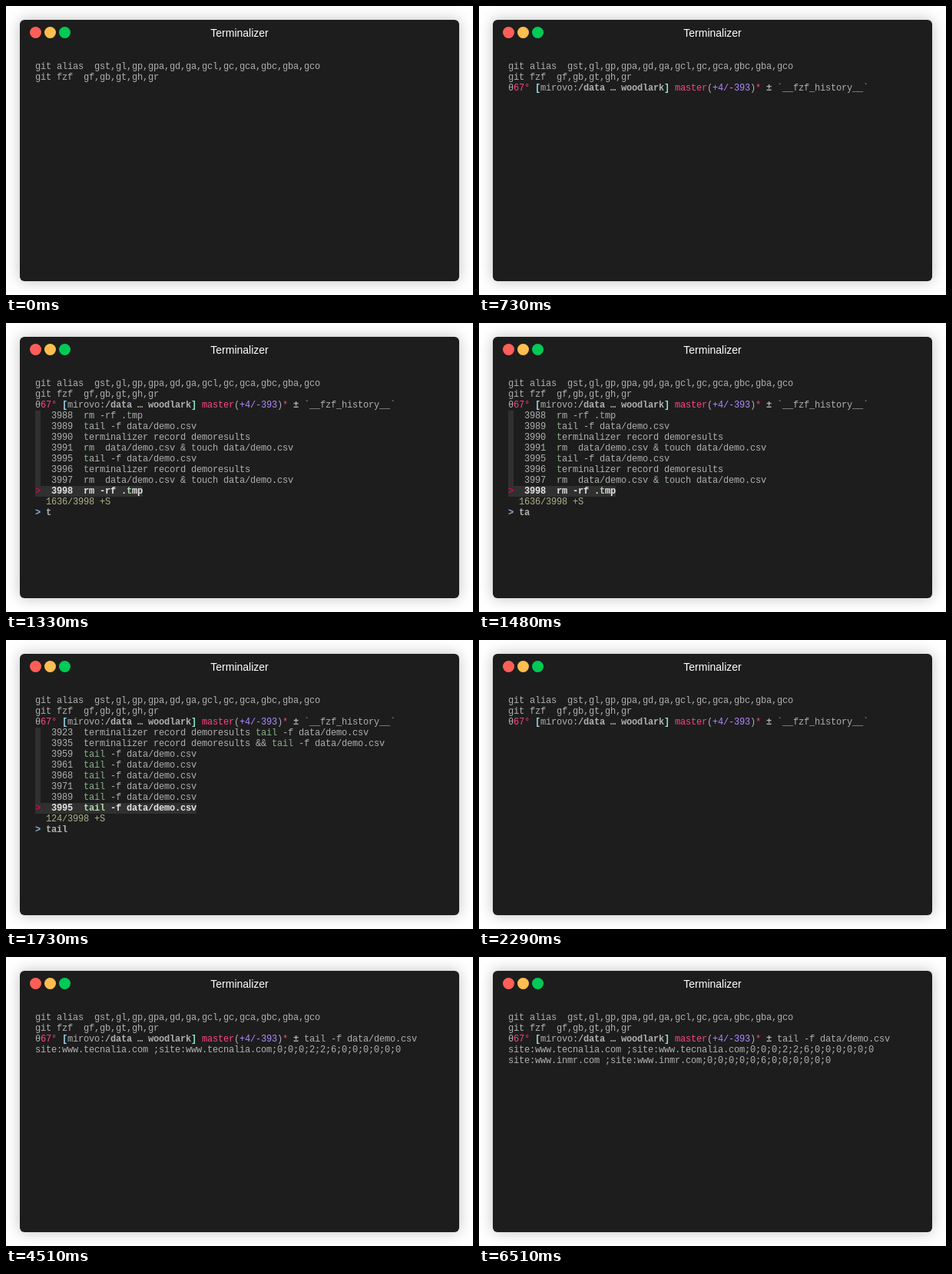
Write an HTML page that moves like this. It is 608 by 376 pixels and loops after 8 s.

```html
<!DOCTYPE html>
<html lang="en">
<head>
<meta charset="utf-8">
<title>Terminal</title>
<style>
html, body { margin: 0; width: 100%; height: 100%; overflow: hidden; background: #fff; }
.window {
  position: absolute; left: 18px; top: 18px; width: 572px; height: 340px;
  border-radius: 6px; background: #1d1d1d; box-shadow: 0 0 18px rgba(0, 0, 0, .25);
}
.dot { position: absolute; top: 9px; width: 15px; height: 15px; border-radius: 50%; }
.title {
  position: absolute; left: 0; right: 0; top: 9px; text-align: center;
  font: 14px/16px "Liberation Sans", Arial, sans-serif; color: #fff;
}
#screen {
  position: absolute; left: 20px; top: 54px; margin: 0;
  font: 12px/14px "Liberation Mono", "Courier New", monospace;
  letter-spacing: calc(7px - 1ch); color: #afafaf;
  font-variant-ligatures: none;
}
#screen div { height: 14px; white-space: pre; }
#screen span { display: inline-block; height: 14px; vertical-align: top; }
.red { color: #fc4384; }
.violet { color: #ae89fe; }
.open { color: #9adcf0; }
.close { color: #8ee8c8; }
.info { color: #afaf87; }
.ask { color: #87afd7; }
.hit { color: #87af87; }
.gutter, .picked { background: #303030; }
.picked { color: #e4e4e4; font-weight: bold; }
.picked .hit { color: #afd7af; }
.pointer { color: #d7005f; }
</style>
</head>
<body>
<div class="window">
  <i class="dot" style="left:13px;background:#ff5f58"></i>
  <i class="dot" style="left:32px;background:#ffbe50"></i>
  <i class="dot" style="left:51px;background:#00ca56"></i>
  <div class="title">Terminalizer</div>
  <div id="screen"></div>
</div>
<script>
const LOOP = 8000;
const screen = document.getElementById('screen');

const header = ['git alias  gst,gl,gp,gpa,gd,ga,gcl,gc,gca,gbc,gba,gco', 'git fzf  gf,gb,gt,gh,gr'];
const prompt = 'θ<span class="red">67°</span> <b class="open">[</b>mirovo:<b>/data … woodlark</b>' +
  '<b class="close">]</b> <span class="red">master</span>(<span class="violet">+4/-393</span>)' +
  '<span class="red">*</span> <b>±</b> ';
const search = prompt + '`__fzf_history__`';

const tail = 'tail -f data/demo.csv';
const record = 'terminalizer record demoresults';
const renew = 'rm  data/demo.csv &amp; touch data/demo.csv';
const remove = 'rm -rf .tmp';
const demo = './demo.sh';

const recent = [[3991, renew], [3992, demo], [3993, 'sudo service selenium restart'], [3994, demo],
  [3995, tail], [3996, record], [3997, renew], [3998, remove]];
const withT = [[3988, remove], [3989, tail], [3990, record], [3991, renew],
  [3995, tail], [3996, record], [3997, renew], [3998, remove]];
const withTail = [[3923, `${record} ${tail}`], [3935, `${record} &amp;&amp; ${tail}`],
  ...[3959, 3961, 3968, 3971, 3989, 3995].map(n => [n, tail])];

function mark(text, query) {
  return query ? text.replace(new RegExp('\\b' + query), '<span class="hit">$&</span>') : text;
}

// History picker: the last item is selected, the query line is below.
function picker(items, count, query, matched = query) {
  const rows = items.map(([n, text], i) => {
    const entry = `  ${n}  ${mark(text, matched)}`;
    return i === items.length - 1
      ? `<span class="picked"><span class="pointer">&gt;</span>${entry}</span>`
      : `<span class="gutter"> </span>${entry}`;
  });
  return [...header, search, ...rows,
    `  <span class="info">${count}/3998 +S</span>`,
    `<b class="ask">&gt;</b> <b>${query}</b>`];
}

const command = [...header, prompt + tail];
const first = [...command, 'site:www.tecnalia.com ;site:www.tecnalia.com;0;0;0;2;2;6;0;0;0;0;0;0'];
const second = [...first, 'site:www.inmr.com ;site:www.inmr.com;0;0;0;0;0;6;0;0;0;0;0;0'];

const scenes = [
  [0, header],
  [120, [...header, prompt]],
  [730, [...header, search]],
  [770, picker(recent, 3998, '')],
  [1300, picker(recent, 3998, 't', '')],
  [1330, picker(withT, 1636, 't')],
  [1480, picker(withT, 1636, 'ta', 't')],
  [1560, picker(withTail, 132, 'tai')],
  [1730, picker(withTail, 124, 'tail')],
  [2290, [...header, search]],
  [2390, command],
  [4510, first],
  [6510, second]
];

const start = performance.now();
let shown = null;

function draw() {
  const time = (performance.now() - start) % LOOP;
  const lines = scenes.findLast(([from]) => from <= time)[1];
  if (lines !== shown) {
    shown = lines;
    screen.innerHTML = lines.map(line => `<div>${line}</div>`).join('');
  }
  requestAnimationFrame(draw);
}
draw();
</script>
</body>
</html>
```
